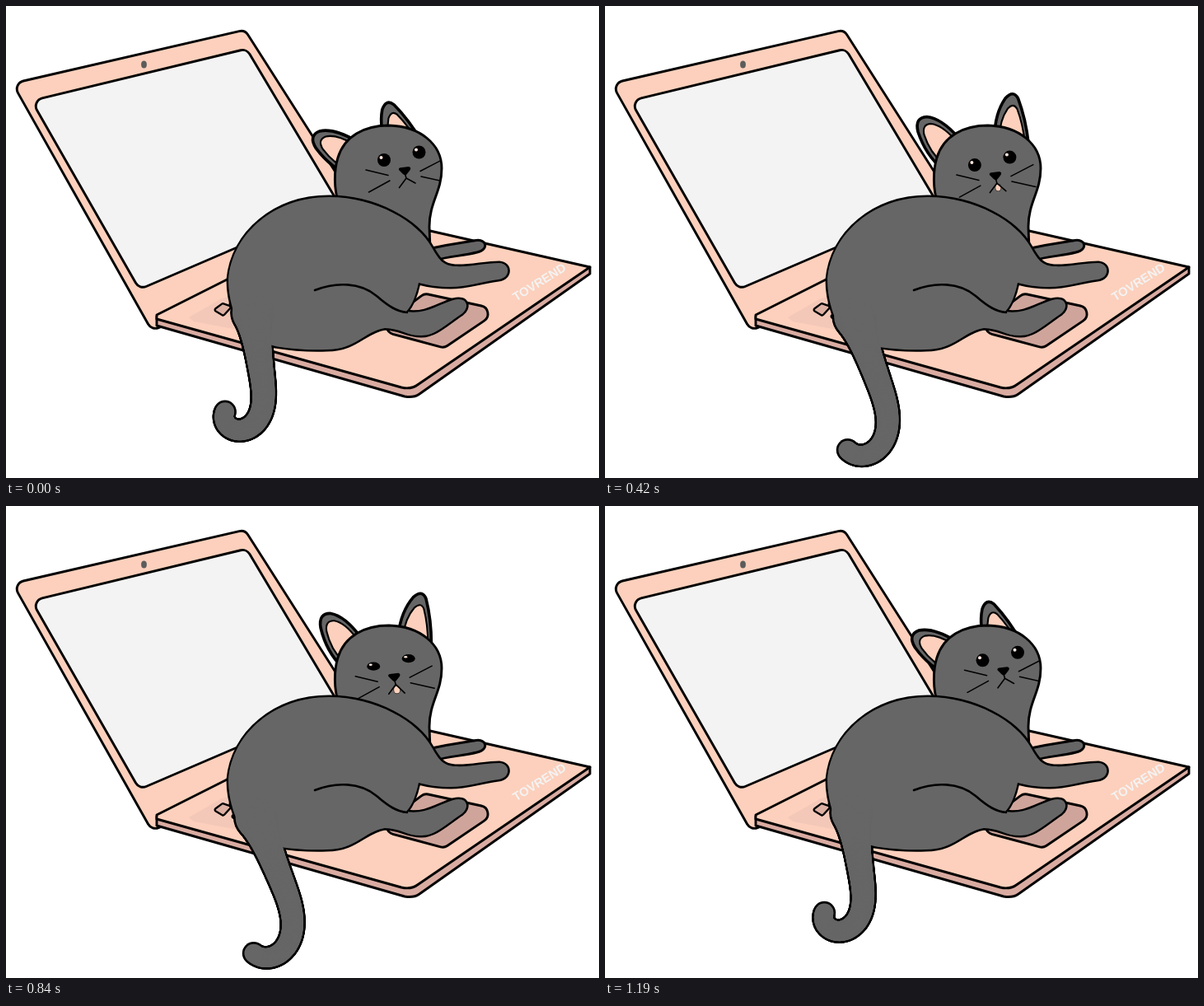
An HTML page with a canvas that plays this animation: 720 px wide and 573 px high, repeating every 1.26 s.

```html
<!DOCTYPE html>
<html lang="en">
<head>
<meta charset="utf-8">
<title>Cat on a laptop</title>
<style>
html, body { margin: 0; width: 100%; height: 100%; overflow: hidden; background: #fff; }
canvas { display: block; }
</style>
</head>
<body>
<canvas id="stage" width="720" height="573"></canvas>
<script>
const ctx = document.getElementById('stage').getContext('2d');
const LOOP = 1260, STEP = 70, RAD = Math.PI / 180;
const FUR = '#666', PINK = '#fcd0bc', SHADE = '#d9aba1', PAD = '#cfa59b', KEY = '#dcb0a3';

const path = d => new Path2D(d);
const mix = (a, b, k) => a + (b - a) * k;

// Four-cornered plate with round corners
function plate(r, ...corners) {
  const p = new Path2D();
  const [a, b] = [corners[0], corners[3]];
  p.moveTo((a[0] + b[0]) / 2, (a[1] + b[1]) / 2);
  corners.forEach((c, i) => p.arcTo(...c, ...corners[(i + 1) % 4], r));
  p.closePath();
  return p;
}

function shape(p, fill, line = 2.9) {
  if (fill) { ctx.fillStyle = fill; ctx.fill(p); }
  if (line) { ctx.strokeStyle = '#000'; ctx.lineWidth = line; ctx.stroke(p); }
}

function ellipse(x, y, rx, ry, fill) {
  ctx.beginPath();
  ctx.ellipse(x, y, rx, ry, 0, 0, 7);
  ctx.fillStyle = fill;
  ctx.fill();
}

// Laptop
const lid = plate(10, [8, 94], [290, 29], [450, 280], [177, 394]);
const screen = plate(10, [31, 115], [292, 52], [404, 240], [162, 344]);
const pad = plate(10, [450, 393], [508, 349], [600, 369], [532, 415]);
const side = path('M183 377V388L484 474Q495 476 502 471L709 325V317Z');
const deck = path('M183 375L330 301L515 273L709 317L501 459Q492 466 480 463L183 380Z');
const keyArea = path('M222 378L262 355L330 340V402L228 383Z');
const keyCap = plate(2, [252, 369], [263, 361], [274, 365], [264, 376]);

// Cat
const head = path('M404 240C398 222 398 200 403 184C411 158 435 145 465 145C503 146 529 168 529 197C529 226 514 238 514 268L515 295L440 300Z');
const farPaw = path('M512 295C540 289 555 287 568 285C584 281 587 296 572 299C552 304 540 303 520 309Z');
const body = path('M270 332C275 275 327 232 392 232C450 232 500 262 517 293' +
  'C525 307 530 315 545 316C565 317 580 312 599 312C613 313 613 330 598 332C575 335 560 341 540 341' +
  'C525 341 512 339 501 336C498 350 494 362 486 371C510 375 525 362 543 357C560 352 564 366 553 374' +
  'C535 386 521 400 505 400C488 401 478 391 460 391C435 395 425 417 390 417C365 418 345 416 327 413' +
  'L296 404C280 388 270 360 270 332Z');
const thigh = path('M375 345C400 335 430 335 450 352C465 365 475 371 487 372');
const nose = path('M477 199Q476 196 481 196L489 195Q493 196 490 200L486 205Q484 206 482 204Z');
const whiskers = path('M437 199L464 205.5M440.5 226L466 212M503 200.5L530 186.5M504 207L533 213.5');

// Raised ears; each swings about its pivot, the lining is a smaller copy about its core
const EARS = [
  { outline: path('M406 192Q389 172 385 142Q384 124 399 126Q416 131 432 158Z'),
    pivot: [440, 174], core: [412, 163], turn: 29 },
  { outline: path('M481 152Q488 125 505 110Q517 102 520 114Q523 140 519 170Z'),
    pivot: [504, 188], core: [503, 162], turn: 38 }
];

// 0 at rest, 1 at the far end of the swing; rest is at time `rest`
function swing(t, rest) {
  const d = (t - rest + LOOP) % LOOP;
  const k = (Math.min(d, LOOP - d) - 40) / 590;
  return (1 - Math.cos(Math.PI * Math.max(0, k))) / 2;
}

// Walk along the tail: straight root, then an ever tighter hook
function tailDots(p) {
  const q = Math.sin(p * Math.PI / 2), n = 160;
  const length = mix(193, 213, q), hook = mix(215, 150, q), root = mix(-8, -26, p);
  let x = mix(300, 305, p), y = mix(372, 380, p);
  const dots = [];
  for (let i = 0; i <= n; i++) {
    const u = i / n;
    dots.push([x, y, 11.2 + 5 * (1 - u) + 9 * (1 - u) ** 8]);
    const a = (root + hook * Math.max(0, (u - 0.36) / 0.64) ** 2.4) * RAD;
    x -= Math.sin(a) * length / n;
    y += Math.cos(a) * length / n;
  }
  return dots;
}

function drawLaptop() {
  shape(lid, PINK);
  shape(screen, '#f3f3f3');
  ellipse(167.5, 71, 3.4, 4.6, '#5c5c5c');
  shape(side, SHADE);
  shape(deck, PINK);
  shape(keyArea, '#f3c8b8', 0);
  for (const [dx, dy] of [[0, 0], [18, -7], [21, 8]]) {
    ctx.save();
    ctx.translate(dx, dy);
    shape(keyCap, KEY, 2.4);
    ctx.restore();
  }
  shape(pad, PAD);
  ctx.save();
  ctx.translate(648, 336);
  ctx.rotate(-32 * RAD);
  ctx.font = 'bold 15px "Liberation Sans", Arial, sans-serif';
  ctx.textAlign = 'center';
  ctx.textBaseline = 'middle';
  ctx.fillStyle = '#f3f3f3';
  ctx.fillText('TOVREND', 0, 0);
  ctx.restore();
}

function drawEars(p) {
  for (const { outline, pivot: [px, py], core: [cx, cy], turn } of EARS) {
    ctx.save();
    ctx.translate(px, py);
    ctx.rotate((p - 1) * turn * RAD);
    ctx.translate(-px, -py);
    shape(outline, FUR, 3.6);
    ctx.translate(cx, cy);
    ctx.scale(0.75, 0.75);
    ctx.translate(-cx, -cy);
    shape(outline, PINK, 2.8);
    ctx.restore();
  }
}

function drawFace(p, t) {
  const open = Math.min(1, 0.18 + Math.abs(t - 910) / 155);
  ctx.save();
  ctx.clip(head);
  ctx.translate(-16 * p, 9.6 * p);
  for (const [x, y] of [[459, 187], [501.5, 177.5]]) {
    ellipse(x, y, 8, 8 * open, '#000');
    ellipse(x - 3.5, y - 3 * open, 2, 2 * open, '#fbe3da');
  }
  if (p > 0.08) {
    const size = Math.min(1, 0.35 + 0.7 * p);
    ellipse(487.5, 211 + 5.5 * p, 4.6 * size, 5.6 * size, '#000');
    ellipse(487.5, 211 + 5.5 * p, 4 * size, 5 * size, PINK);
  }
  shape(nose, '#000', 0);
  shape(path(`M484.5 204L486 209L477.5 220.5M486 209L497 ${215 + 5.5 * p}`), null, 1.6);
  shape(whiskers, null, 1.5);
  ctx.restore();
}

// Black silhouette first, then fur, so that body and tail join without a seam
function drawBody(p) {
  const dots = tailDots(p);
  shape(body, null, 5);
  for (const [x, y, r] of dots) ellipse(x, y, r + 2.7, r + 2.7, '#000');
  shape(body, FUR, 0);
  for (const [x, y, r] of dots) ellipse(x, y, r, r, FUR);
  shape(thigh, null, 2.6);
}

function draw(t) {
  const look = swing(t, 35);
  ctx.fillStyle = '#fff';
  ctx.fillRect(0, 0, 720, 573);
  drawLaptop();
  drawEars(look);
  shape(farPaw, FUR);
  shape(head, FUR);
  drawFace(look, t);
  drawBody(swing(t, 20));
}

ctx.lineJoin = ctx.lineCap = 'round';
const start = performance.now();
function tick() {
  const t = (performance.now() - start) % LOOP;
  draw(Math.floor(t / STEP) * STEP);
  requestAnimationFrame(tick);
}
tick();
</script>
</body>
</html>
```
